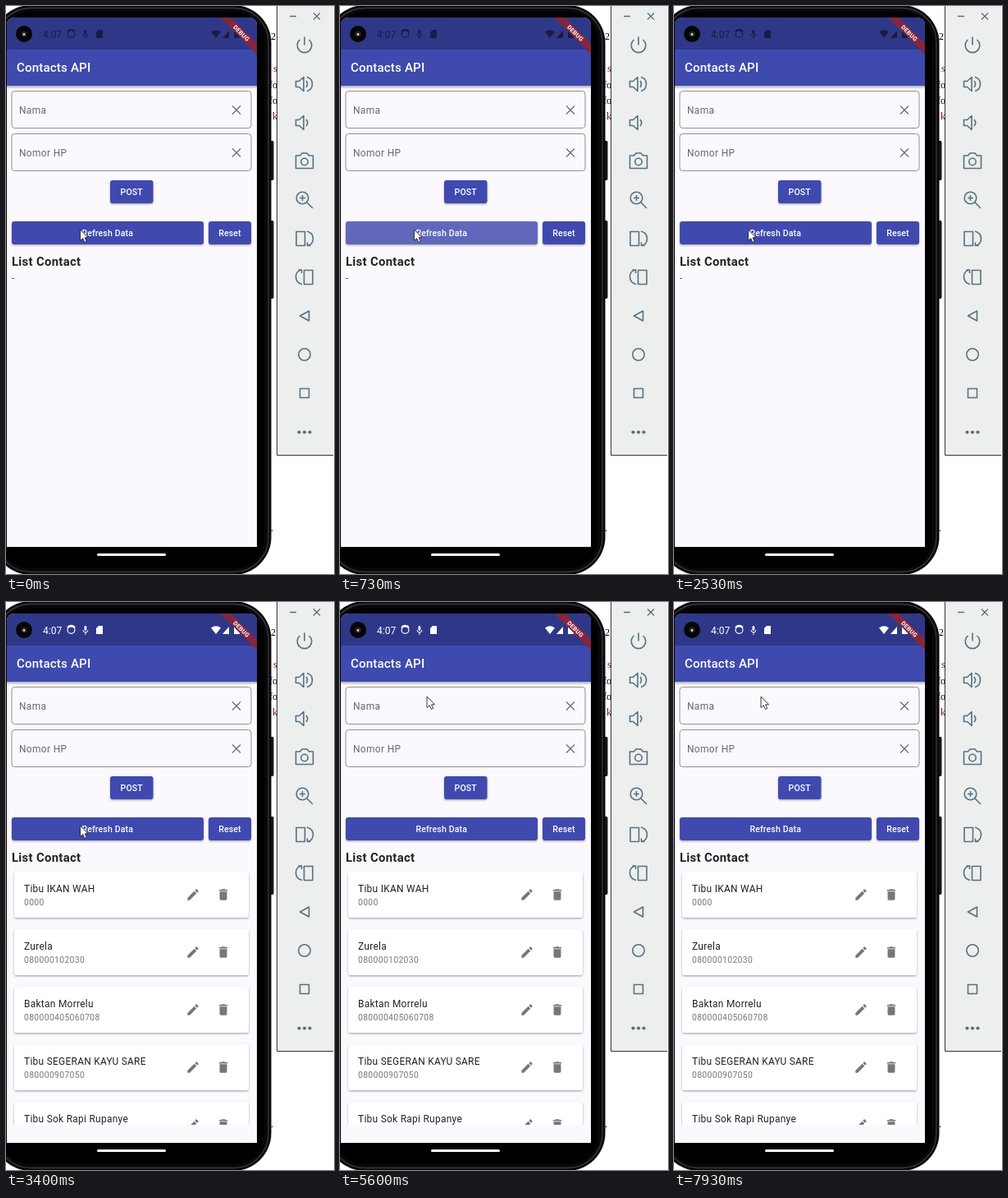
Recreate the animation shown at these times as an HTML page. Size 400x691 px, loop 8 s.

```html
<!DOCTYPE html>
<html lang="id">
<head>
<meta charset="utf-8">
<title>Contacts API</title>
<style>
html, body { margin: 0; width: 100%; height: 100%; overflow: hidden; background: #fff; }
svg { display: block; width: 100vw; height: 100vh; }
text { font-family: Roboto, sans-serif; }
.serif text { font: 12px "Liberation Serif", serif; }
.field { fill: none; stroke: #929197; }
.label { font-size: 11.9px; letter-spacing: .37px; fill: #68676b; }
.btn { font-size: 10.5px; font-weight: 500; letter-spacing: .15px; fill: #fff; text-anchor: middle; }
.name { font-size: 11.9px; letter-spacing: .3px; fill: #222; }
.phone { font-size: 10.4px; letter-spacing: .34px; fill: #777; }
.tools { fill: none; stroke: #587080; stroke-width: 1.6; stroke-linejoin: round; }
.tools .solid { fill: #587080; stroke: none; }
</style>
</head>
<body>
<svg viewBox="0 0 400 691" preserveAspectRatio="none">
  <defs>
    <clipPath id="screen"><path d="M1 658V24Q1 14 11 14H296Q306 14 306 24V658Z"/></clipPath>
    <clipPath id="listBox"><rect y="318" width="306" height="318"/></clipPath>
    <clipPath id="refreshBox"><rect x="7" y="262" width="234" height="28" rx="3"/></clipPath>
    <filter id="shadow" x="-10%" y="-20%" width="120%" height="150%">
      <feDropShadow dx="0" dy="1.2" stdDeviation="1" flood-opacity=".35"/>
    </filter>
    <linearGradient id="barShade" x2="0" y2="1">
      <stop stop-color="#000" stop-opacity=".3"/><stop offset="1" stop-color="#000" stop-opacity="0"/>
    </linearGradient>
    <path id="edit" d="M3 17.25V21h3.75L17.81 9.94l-3.75-3.75zM20.71 7.04c.39-.39.39-1.02 0-1.41l-2.34-2.34c-.39-.39-1.02-.39-1.41 0l-1.83 1.83 3.75 3.75z"/>
    <path id="bin" d="M6 19c0 1.1.9 2 2 2h8c1.1 0 2-.9 2-2V7H6zM19 4h-3.5l-1-1h-5l-1 1H5v2h14z"/>
  </defs>

  <!-- document behind the windows -->
  <g class="serif">
    <text x="323" y="41">2</text>
    <g fill="#7a1820"><text x="326" y="80">s</text><text x="325" y="138">k</text></g>
    <text x="321" y="100">fo</text><text x="321" y="119">fo</text><text x="323" y="639">.</text>
  </g>

  <!-- phone body -->
  <path d="M322 164h3q1.500 0 1.500 2v44q0 2-1.500 2h-3zM322 261h3q1.500 0 1.500 2v91q0 2-1.500 2h-3z" fill="#15151a"/>
  <rect x="-16" y="-1" width="339.500" height="693" rx="46" fill="#08080a"/>
  <rect x="-12" y="2.500" width="332" height="686" rx="42" fill="none" stroke="#3a3a3e" stroke-width="1.300"/>
  <rect x="-7" y="7" width="322" height="677" rx="36" fill="#000"/>
  <rect x="111" y="666" width="84" height="3" rx="1.500" fill="#fff"/>

  <g clip-path="url(#screen)">
    <rect y="14" width="306" height="645" fill="#fbf9fd"/>
    <rect y="97" width="306" height="4" fill="url(#barShade)"/>
    <rect y="14" width="306" height="83" fill="#3f4aae"/>
    <rect y="14" width="306" height="39" fill="#2f3888"/>
    <text x="13" y="80" font-size="15.1" font-weight="500" letter-spacing=".15" fill="#fff">Contacts API</text>

    <g id="status">
      <text x="45" y="39" font-size="12">4:07</text>
      <path d="M75 31Q79.500 27 84 31" fill="none" stroke="currentColor" stroke-width="2.200"/>
      <circle cx="79.500" cy="34" r="4.400" fill="none" stroke="currentColor" stroke-width="1.200"/>
      <rect x="95.500" y="29" width="2.800" height="6" rx="1.400"/>
      <path d="M94 34q0 3 3 3t3-3M97 37v3" fill="none" stroke="currentColor"/>
      <path d="M113 29h5v10h-8v-7z"/>
      <path d="M250 31.500Q256 27 262 31.500L256 39ZM264 39l8-9v9ZM278 30h2v-1h3v1h2v9h-7z"/>
    </g>
    <circle cx="22" cy="34" r="10" fill="#050507"/>
    <circle cx="22" cy="34" r="3.600" fill="#25252b"/>
    <circle cx="22" cy="34.500" r="1.400" fill="#cfd3dd"/>

    <g transform="translate(287 33) rotate(45)">
      <rect x="-45" y="-4.700" width="90" height="9.400" fill="#84263f"/>
      <text y="2.600" font-size="7.400" font-weight="900" letter-spacing=".2" text-anchor="middle" fill="#f2e6ea">DEBUG</text>
    </g>

    <g id="form"></g>
    <g clip-path="url(#refreshBox)"><g id="press" fill="#fff">
      <rect x="7" y="262" width="234" height="28" opacity=".08"/>
      <circle id="ripple" cx="91" cy="276" opacity=".1"/>
    </g></g>
    <text class="btn" x="123.700" y="279.500">Refresh Data</text>
    <text x="7" y="315.500" font-size="14.840" font-weight="700" letter-spacing=".33" fill="#222">List Contact</text>
    <text id="empty" x="7" y="335" font-size="10.400" fill="#222">-</text>
    <g id="list" clip-path="url(#listBox)"></g>
  </g>

  <!-- emulator tool panel -->
  <rect x="330" y="-1" width="69" height="548" fill="#ecefed"/>
  <path d="M330.500 0V546.500H399" fill="none" stroke="#30343a"/>
  <g class="tools">
    <path d="M346 12.500h8M375 8.500l8 8m0-8l-8 8" stroke-width="1.300"/>
    <path d="M364 37.500v10M358.500 41a8.800 8.800 0 1 0 11 0"/>
    <path id="speaker" d="M353.500 91.500h4l5.500-5v17l-5.500-5h-4z"/>
    <path d="M366 91q3 4 0 8M367 86.500q6.500 1.500 6.500 8.500t-6.500 8.500"/>
    <use href="#speaker" y="47"/><path d="M366 138q3.500 4 0 8"/>
    <path d="M353.500 182h5l2.500-3h6l2.500 3h5v15.500h-21z"/><circle cx="364" cy="189.500" r="4.200"/>
    <circle cx="361.500" cy="233.500" r="7.300"/><path d="M367 239l7 7M358 233.500h7M361.500 230v7"/>
    <g id="rotate"><rect x="354" y="274.500" width="10.500" height="17"/><path d="M367 274q7.500 2 7.500 9t-6.500 8.500M371.500 291.500h-4v-4"/></g>
    <g transform="translate(728 47) scale(-1 1)"><rect x="354" y="274.500" width="10.500" height="17"/><path d="M367 291.500q7.500-2 7.500-9t-6.500-8.500M371.500 274h-4v4"/></g>
    <path d="M369.500 371v12l-11-6z"/>
    <circle cx="364" cy="424" r="7.200"/>
    <rect x="358.500" y="465.500" width="11" height="11"/>
    <g class="solid"><circle cx="357.500" cy="518.500" r="2.100"/><circle cx="364" cy="518.500" r="2.100"/><circle cx="370.500" cy="518.500" r="2.100"/></g>
  </g>

  <path id="cursor" d="M0 0V13.500L3.200 10.700 5.400 15.500 7.700 14.400 5.600 9.800H9.500Z" fill="#fff" stroke="#222" stroke-width=".9"/>
</svg>
<script>
const $ = id => document.getElementById(id);

const field = (y, label) => `
  <rect class="field" x="7" y="${y}" width="292" height="45" rx="3.500"/>
  <text class="label" x="16" y="${y + 27}">${label}</text>
  <path d="M276 ${y + 18}l10 10m0-10l-10 10" stroke="#707074" stroke-width="1.4"/>`;
const button = (x, y, w, label) => `
  <rect x="${x}" y="${y}" width="${w}" height="28" rx="3" fill="#3f4aae" filter="url(#shadow)"/>
  <text class="btn" x="${x + w / 2}" y="${y + 17.5}">${label}</text>`;
const icon = (id, x, y) =>
  `<use href="#${id}" transform="translate(${x - 8.9} ${y - 8.9}) scale(.742)" fill="#777"/>`;
const card = ([name, phone], i) => {
  const y = 328 + 70 * i;
  return `<rect x="10" y="${y}" width="286" height="56" rx="3" fill="#fff" filter="url(#shadow)"/>
    <text class="name" x="22" y="${y + 25}">${name}</text>
    <text class="phone" x="22" y="${y + 40.5}">${phone}</text>
    ${icon("edit", 228, y + 28)}${icon("bin", 265, y + 28)}`;
};

$("form").innerHTML = field(103.5, "Nama") + field(155.5, "Nomor HP") +
  button(127, 212, 52.5, "POST") + button(7, 262, 234, "") + button(247, 262, 52, "Reset");
$("list").innerHTML = [
  ["Tibu IKAN WAH", "0000"],
  ["Zurela", "080000102030"],
  ["Baktan Morrelu", "080000405060708"],
  ["Tibu SEGERAN KAYU SARE", "080000907050"],
  ["Tibu Sok Rapi Rupanye", "080000304050"]
].map(card).join("");

const LOOP = 8000, PRESS = 470, RELEASE = 850, LOADED = 2800;
const ramp = (t, from, to) => Math.min(1, Math.max(0, (t - from) / (to - from)));
const ease = x => x * x * (3 - 2 * x);

function draw(now) {
  const t = now % LOOP, loaded = t >= LOADED;
  $("press").setAttribute("opacity", ramp(t, PRESS, PRESS + 150) * (1 - ramp(t, RELEASE, RELEASE + 350)));
  $("ripple").setAttribute("r", 10 + 160 * ease(ramp(t, PRESS, PRESS + 250)));
  $("list").style.display = loaded ? "" : "none";
  $("empty").style.display = loaded ? "none" : "";
  $("status").style.color = $("status").style.fill = loaded ? "#fff" : "#191d45";

  const toForm = ease(ramp(t, 3600, 4300)), toName = ease(ramp(t, 4700, 5100));
  const x = 90.5 + 13.5 * toForm + 2 * toName;
  const y = 272 - 118 * toForm - 39 * toName;
  $("cursor").setAttribute("transform", `translate(${x} ${y})`);
}

function tick() {
  draw(performance.now());
  requestAnimationFrame(tick);
}
tick();
</script>
</body>
</html>
```
